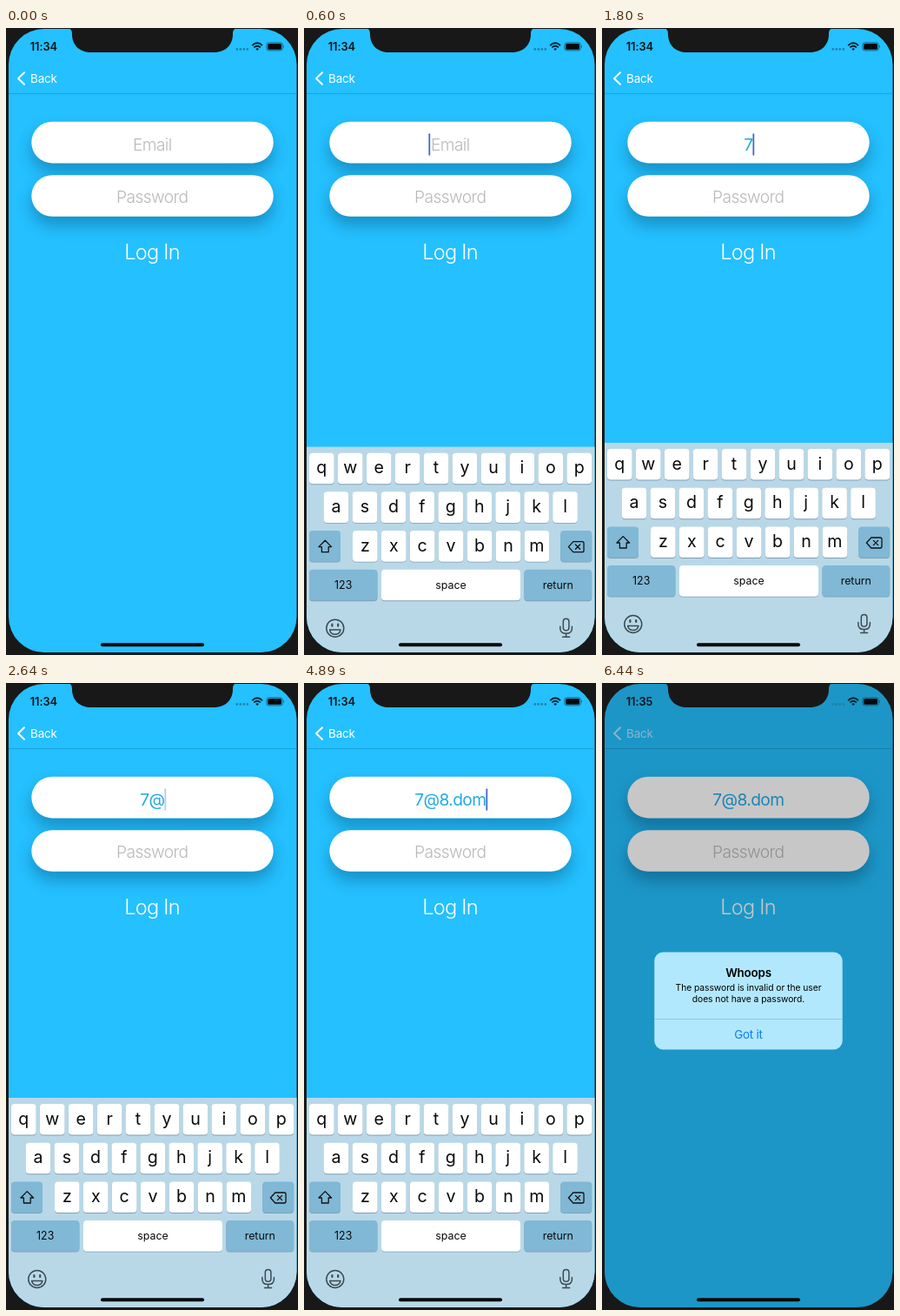
An HTML page for the animation above (6540 ms loop, 336 px wide and 721 px high).

```html
<!DOCTYPE html>
<html lang="en">
<head>
<meta charset="utf-8">
<title>Log in</title>
<style>
  html, body { margin: 0; width: 100%; height: 100%; overflow: hidden; background: #181818; }
  svg { display: block; width: 100%; height: 100%; font-family: Inter, "Liberation Sans", sans-serif; }
  .mid { text-anchor: middle; }
  .field { font-size: 19.2px; letter-spacing: -.6px; font-weight: 300; white-space: pre; }
  .hint { fill: #b9b9bb; }
  .small { font-size: 10.3px; letter-spacing: -.05px; }
  .line { fill: none; stroke: #111; stroke-linecap: round; stroke-linejoin: round; }
</style>
</head>
<body>
<svg viewBox="0 0 336 721" xmlns="http://www.w3.org/2000/svg">
  <defs>
    <clipPath id="screen"><rect x="3" y="1" width="331.5" height="717" rx="41"/></clipPath>
    <filter id="soft" x="-20%" y="-60%" width="140%" height="260%"><feGaussianBlur stdDeviation="9"/></filter>
  </defs>
  <rect width="336" height="721" fill="#181818"/>
  <g clip-path="url(#screen)">
    <rect width="336" height="721" fill="#24c0ff"/>
    <rect y="75" width="336" height="1" fill="#1ba3dc"/>
    <g id="back">
      <path d="M21 51.2L14 58L21 64.8" fill="none" stroke="#fff" stroke-width="2" stroke-linecap="round" stroke-linejoin="round"/>
      <text x="28" y="62.8" font-size="13.5" letter-spacing="-.2" fill="#fff">Back</text>
    </g>
    <g id="pills"></g>
    <text id="hint" class="mid field hint" x="168.3" y="141">Email</text>
    <text id="typed" class="mid field" x="168.3" y="141" fill="#22aae8" style="font-weight:400"></text>
    <rect id="caret" y="121.3" width="1.8" height="25.4" rx=".9" fill="#3f6bc4"/>
    <text class="mid field hint" x="168.3" y="200.5">Password</text>
    <text id="login" class="mid" x="168" y="265.7" font-size="23.6" font-weight="300" letter-spacing="-.75" fill="#fff">Log In</text>
    <g id="board"></g>
    <rect id="dim" width="336" height="721" fill="#000"/>
    <g id="alert">
      <rect x="60.3" y="309.5" width="216.4" height="112" rx="10" fill="#b2e8fe"/>
      <rect x="60.3" y="386" width="216.4" height=".8" fill="#87c3dd"/>
      <text class="mid" x="168.5" y="338.4" font-size="13.4" font-weight="600" letter-spacing="-.2">Whoops</text>
      <g class="mid small">
        <text x="168.5" y="354.3">The password is invalid or the user</text>
        <text x="168.5" y="367.2">does not have a password.</text>
      </g>
      <text class="mid" x="168.5" y="408.8" font-size="13.4" letter-spacing="-.2" fill="#0a7cf5">Got it</text>
    </g>
    <text id="clock" x="27.8" y="26" font-size="12.8" font-weight="600" letter-spacing="-.1" fill="#0b1216"></text>
    <g id="dots" fill="#1d7fa8"></g>
    <g fill="none" stroke="#06202b" stroke-width="1.9">
      <path d="M283.2 20.1Q289.1 14.6 295 20.1M285.3 22.4Q289.1 19 292.9 22.4"/>
      <path d="M287.2 23.9Q289.1 22.4 291 23.9L289.1 25.9Z" fill="#06202b" stroke="none"/>
    </g>
    <rect x="299.9" y="16.9" width="18.4" height="9" rx="2.6" fill="none" stroke="#14556f" stroke-width=".9"/>
    <rect x="301.2" y="18.1" width="15.8" height="6.6" rx="1.5" fill="#05090b"/>
    <path d="M319.3 19.8Q321 21.4 319.3 23Z" fill="#14556f"/>
    <rect x="109" y="707.2" width="119" height="4" rx="2" fill="#05080a"/>
  </g>
  <path d="M69 0C75 0 76 3 76 7C76 20 85 28 98 28H239C252 28 261 20 261 7C261 3 262 0 268 0Z" fill="#181818"/>
</svg>
<script>
const LOOP = 6540;
const BOARD_TOP = 477;
const EMAIL = "7@8.dom";
const TYPE_AT = [1800, 2640, 3140, 3840, 4740, 4840, 4890];
// Caret opacity as [time, value] points, joined by straight lines.
const CARET = [
  [349.9, 0], [350, 1], [1249, 1], [1250, .5], [1300, 0], [1799.9, 0], [1800, 1],
  [2320, 1], [2440, 0], [2639.9, 0], [2640, .35], [2840, 1], [3620, 1], [3690, 0],
  [3839.9, 0], [3840, 1], [4420, 1], [4540, 0], [4739.9, 0], [4740, .35], [4890, 1],
  [5439.9, 1], [5440, 0]
];
const $ = id => document.getElementById(id);
const clamp = v => Math.max(0, Math.min(1, v));

// Share of the way left to go for a critically damped spring.
function left(ms, speed) {
  const x = Math.max(0, ms) / 1000 * speed;
  return (1 + x) * Math.exp(-x);
}

function track(points, t) {
  if (t <= points[0][0]) return points[0][1];
  for (let i = 1; i < points.length; i++) {
    const [a, va] = points[i - 1], [b, vb] = points[i];
    if (t < b) return va + (vb - va) * (t - a) / (b - a);
  }
  return points[points.length - 1][1];
}

function key(x, y, w, label, size, fill = "#fff") {
  const box = (dy, color) =>
    `<rect x="${x}" y="${y + dy}" width="${w}" height="35.6" rx="4" fill="${color}"/>`;
  const base = size > 15 ? 23.6 : 22;
  const text = label &&
    `<text class="mid" x="${x + w / 2}" y="${y + base}" font-size="${size}" fill="#0a0a0a">${label}</text>`;
  return box(.9, "#7f9fb1") + box(0, fill) + text;
}

function buildBoard() {
  const step = 32.94, blue = "#80b8d6";
  let s = `<rect y="${BOARD_TOP}" width="336" height="260" fill="#b8d8e8"/>`;
  [["qwertyuiop", 6], ["asdfghjkl", 22.7], ["zxcvbnm", 56]].forEach(([letters, x], row) => {
    [...letters].forEach((c, i) => { s += key(x + i * step, 484 + row * 44.7, 28.6, c, 19.6); });
  });
  s += key(6, 573.4, 36, "", 0, blue) + key(295.2, 573.4, 36, "", 0, blue);
  s += key(6, 618.1, 78.4, "123", 12.4, blue) + key(89, 618.1, 160, "space", 12.4)
     + key(253.4, 618.1, 77.8, "return", 12.4, blue);
  s += `<g class="line" stroke-width="1.3">
    <path d="M24.3 584.6L31.6 592H28.2V598H20.4V592H17Z"/>
    <path d="M309.8 586H320.2Q322 586 322 588V596Q322 598 320.2 598H309.8L304.4 592ZM312.4 589.4L317.6 594.6M317.6 589.4L312.4 594.6"/>
  </g>
  <g class="line" stroke-width="1.5" style="stroke:#3c4a52">
    <circle cx="35.8" cy="685.5" r="10"/>
    <path d="M29.6 687.4H42Q41 692.6 35.8 692.6Q30.6 692.6 29.6 687.4Z"/>
    <path d="M32.4 681V683M39.2 681V683" stroke-width="2.2"/>
    <rect x="298.3" y="674.6" width="6.6" height="13.6" rx="3.3"/>
    <path d="M294.8 683.5V685.5Q294.8 691.6 301.6 691.6Q308.4 691.6 308.4 685.5V683.5M301.6 691.6V695.6M297.6 695.6H305.6"/>
  </g>`;
  $("board").innerHTML = s;
}

function buildPills() {
  const pill = (y, extra) => `<rect x="29.3" y="${y}" width="278.4" height="47.6" rx="23.8" ${extra}/>`;
  $("pills").innerHTML = [107.8, 169.2].map(y =>
    pill(y + 10, 'fill="#003a5c" opacity=".36" filter="url(#soft)"') + pill(y, 'fill="#fff"')).join("");
  $("dots").innerHTML = [0, 1, 2, 3].map(i =>
    `<circle cx="${265.8 + i * 4}" cy="24.4" r="1.3"/>`).join("");
}

function draw(t) {
  const shown = TYPE_AT.filter(at => t >= at).length;
  $("typed").textContent = EMAIL.slice(0, shown);
  $("hint").setAttribute("opacity", shown ? 0 : 1);
  const end = shown ? 168.3 + $("typed").getComputedTextLength() / 2 : 143.4;
  $("caret").setAttribute("x", end);
  $("caret").setAttribute("opacity", track(CARET, t));

  const hidden = t < 5440 ? left(t - 300, 19.6) : 1 - left(t - 5405, 23);
  $("board").setAttribute("transform", `translate(0 ${hidden * 245})`);
  $("board").setAttribute("visibility", t >= 350 && t < 5690 ? "visible" : "hidden");

  const p = t >= 6040 ? 1 : 1 - left(t - 5624, 18);
  const zoom = 1.2 - .2 * p;
  $("dim").setAttribute("opacity", .22 * p);
  $("alert").setAttribute("opacity", p);
  $("alert").setAttribute("transform",
    `translate(168.5 365.5) scale(${zoom}) translate(-168.5 -365.5)`);
  $("back").setAttribute("opacity", 1 - .38 * clamp(p * 2));
  $("login").setAttribute("opacity", t < 5440 ? 1 : .25 + .75 * clamp((t - 5620) / 360));
  $("clock").textContent = t < 6440 ? "11:34" : "11:35";
}

buildBoard();
buildPills();
const start = performance.now();
function tick() {
  draw((performance.now() - start) % LOOP);
  requestAnimationFrame(tick);
}
tick();
</script>
</body>
</html>
```
